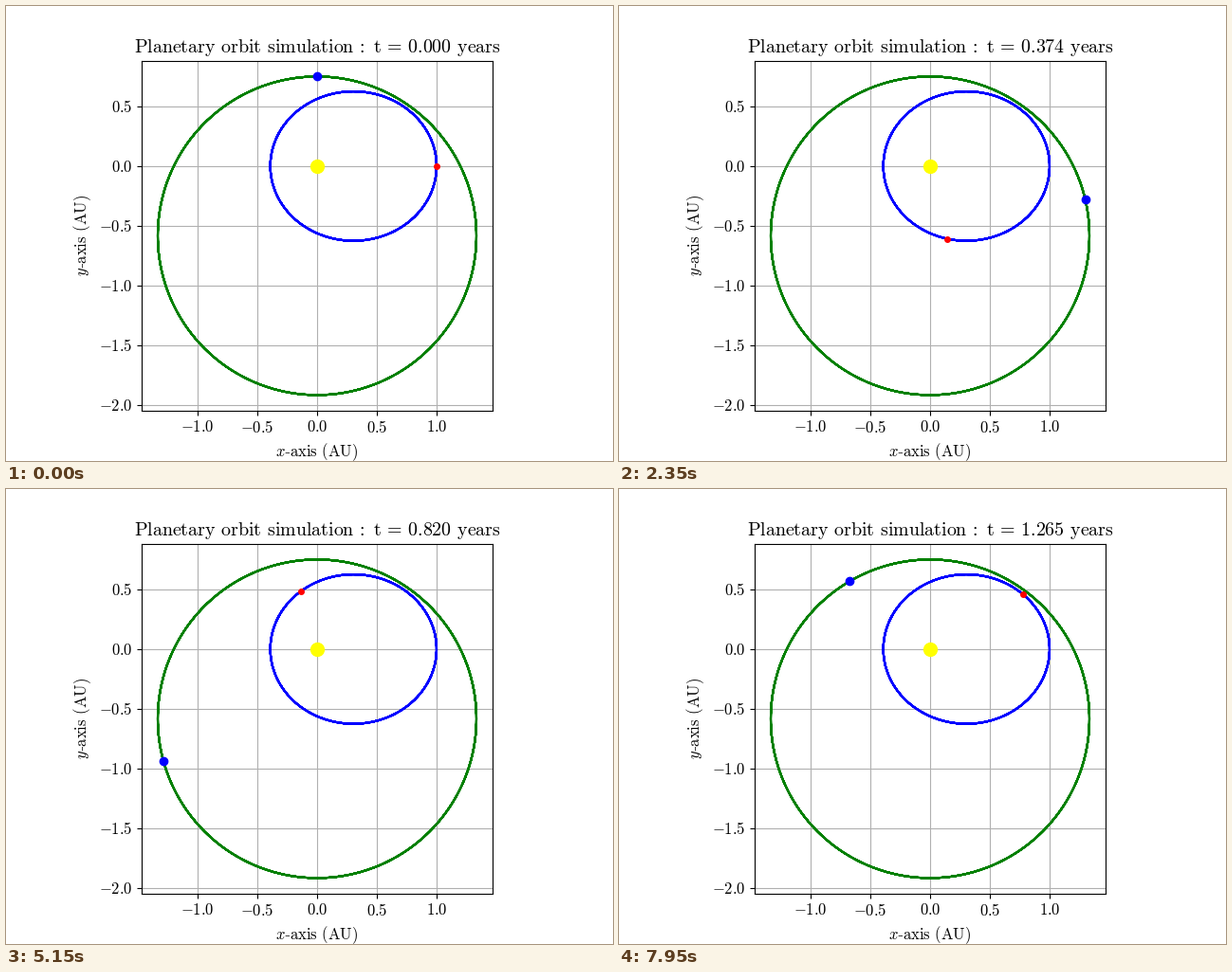
A matplotlib script for the animation above (8 s loop, 640x480 px).

```python
import numpy as np
import matplotlib.pyplot as plt
from matplotlib.animation import FuncAnimation

plt.rcParams.update({
    "font.family": "Liberation Serif",
    "font.size": 12,
    "mathtext.fontset": "cm",
    "mathtext.default": "rm",
})

# Units: AU and year / 2 pi, so GM = 1. The body starts at aphelion.
FRAMES, STEP = 160, 0.05
R0, V0 = 1.0, 0.75
A = 1 / (2 / R0 - V0**2)
ECC = R0 / A - 1
B = A * np.sqrt(1 - ECC**2)
RATE = A**-1.5
LOOPS = 6
GAP = r"\hspace{0.38}"


def state(t):
    """Position and velocity on the Kepler orbit at time t."""
    mean = RATE * np.asarray(t, float)
    d = mean.copy()
    for _ in range(30):
        d = d - (d + ECC * np.sin(d) - mean) / (1 + ECC * np.cos(d))
    speed = RATE / (1 + ECC * np.cos(d))
    pos = A * ECC + A * np.cos(d), B * np.sin(d)
    vel = -A * np.sin(d) * speed, B * np.cos(d) * speed
    return pos, vel


def title(t):
    return (rf"$Planetary{GAP}orbit{GAP}simulation\hspace{{0.18}}:\hspace{{0.306}}"
            rf"t\hspace{{0.18}}=\hspace{{0.18}}{t / (2 * np.pi):.3f}{GAP}years$")


def axis_name(letter):
    return rf"$\mathit{{{letter}}}$-$axis{GAP}(AU)$"


def tick_text(value, _):
    return f"${value:.1f}$"


fig, ax = plt.subplots(figsize=(6.4, 4.8), dpi=100)
ax.set_aspect("equal")
half = 1.1 / V0
mid = V0 - 1 / V0
ax.set_xlim(-half, half)
ax.set_ylim(mid - half, mid + half)
ax.set_xticks(np.arange(-1, 1.1, 0.5))
ax.set_yticks(np.arange(-2, 0.6, 0.5))
ax.xaxis.set_major_formatter(tick_text)
ax.yaxis.set_major_formatter(tick_text)
ax.set_xlabel(axis_name("x"))
ax.set_ylabel(axis_name("y"))
ax.grid(True)

# The velocity vector traces a circle around an offset centre.
orbit, _ = state(np.linspace(0, LOOPS * 2 * np.pi / RATE, LOOPS * 240 + 1))
turn = np.linspace(0, LOOPS * 2 * np.pi, LOOPS * 240 + 1)
ax.plot(*orbit, color="blue")
ax.plot(np.sin(turn) / V0, mid + np.cos(turn) / V0, color="green")
ax.plot([0], [0], "o", color="yellow", ms=10)
planet, = ax.plot([], [], "o", color="red", ms=4)
velocity, = ax.plot([], [], "o", color="blue", ms=6)
heading = ax.set_title(title(0), fontsize=14.35)


def update(i):
    t = i * STEP
    pos, vel = state(t)
    planet.set_data([pos[0]], [pos[1]])
    velocity.set_data([vel[0]], [vel[1]])
    heading.set_text(title(t))
    return planet, velocity, heading


anim = FuncAnimation(fig, update, frames=FRAMES, interval=50,
                     repeat=True, repeat_delay=0)
plt.show()
```
